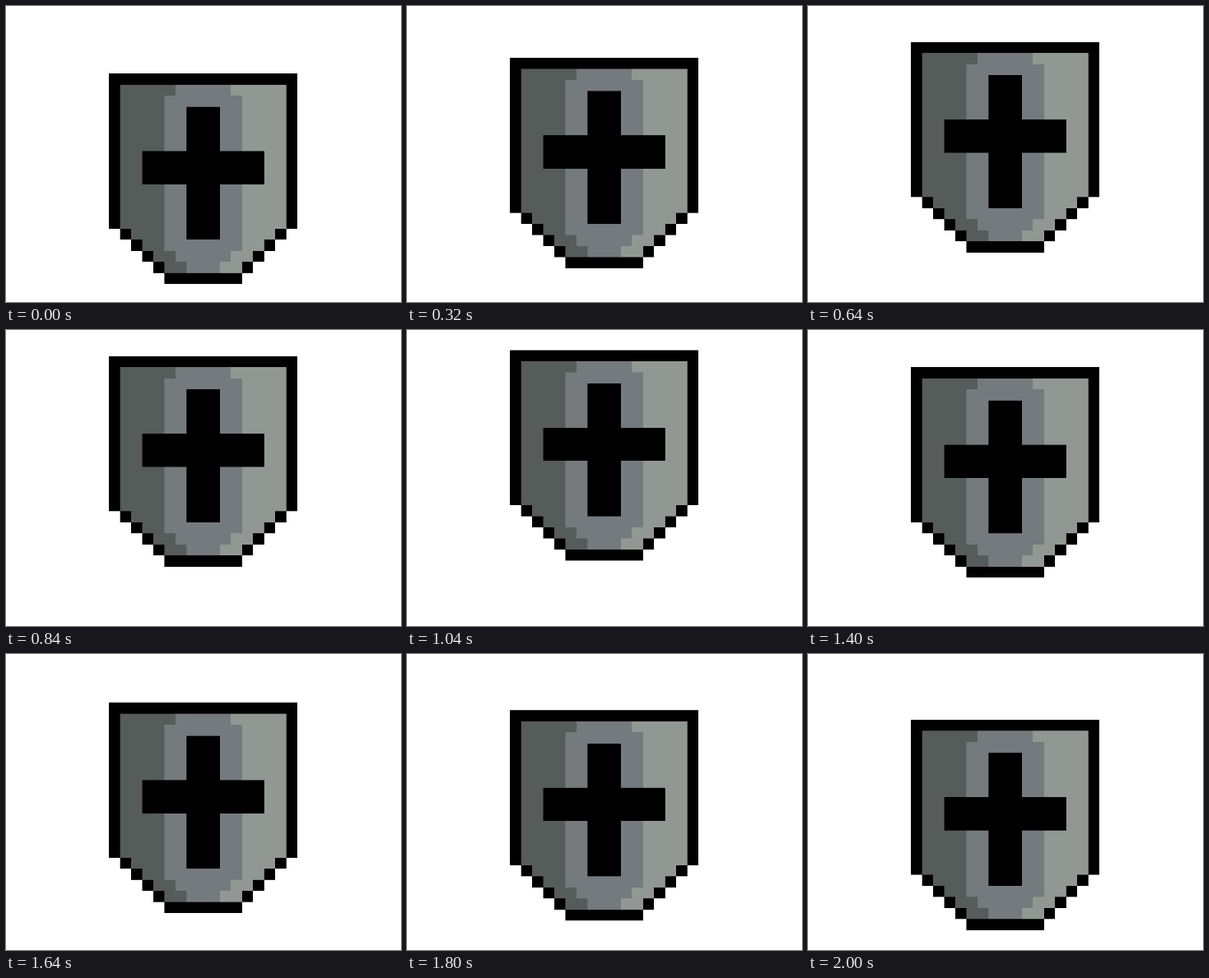
These frames come from a looping animation (480x360 px, 2.04 s). An HTML page with a canvas:

```html
<!DOCTYPE html>
<html lang="en">
<head>
<meta charset="utf-8">
<title>Floating shield</title>
<style>
  html, body { margin: 0; width: 100%; height: 100%; overflow: hidden; background: #fff; }
  canvas { display: block; }
</style>
</head>
<body>
<canvas id="stage" width="480" height="360"></canvas>
<script>
const ctx = document.getElementById('stage').getContext('2d');
const COLS = 17, ROWS = 19, CELL = 13.47, LEFT = 125.1;
const STEP = 40, STEPS = 51, PEAK = 25, LOW = 82.2, HIGH = 22.2;
const BLACK = '#000', DARK = '#565c59', MID = '#757a7e', LIGHT = '#919893';

// Paints the shield at double size with a one-cell clear margin,
// so that scaling it down gives smooth edges at any position.
function makeShield() {
  const size = 27;
  const sprite = document.createElement('canvas');
  sprite.width = (COLS + 2) * size;
  sprite.height = (ROWS + 2) * size;
  const pen = sprite.getContext('2d');
  pen.scale(size, size);
  pen.translate(1, 1);
  const fill = (color, ...box) => {
    pen.fillStyle = color;
    pen.fillRect(...box);
  };

  fill(BLACK, 0, 0, COLS, 1);
  for (let row = 1; row < ROWS - 1; row++) {
    const edge = Math.max(0, row - 13);
    const inset = row === 17 ? 7 : row === 1 || row === 16 ? 6 : 5;
    fill(BLACK, edge, row, COLS - 2 * edge, 1);
    fill(DARK, edge + 1, row, inset - edge - 1, 1);
    fill(MID, inset, row, COLS - 2 * inset, 1);
    fill(LIGHT, COLS - inset, row, inset - edge - 1, 1);
  }
  fill(BLACK, 5, 18, 7, 1);
  // Cross
  fill(BLACK, 7, 3, 3, 12);
  fill(BLACK, 3, 7, 11, 3);
  return sprite;
}

// Rises evenly to the peak, then sinks evenly back.
function shieldTop(step) {
  const lift = step < PEAK ? step / PEAK : (STEPS - step) / (STEPS - PEAK);
  return LOW + (HIGH - LOW) * lift;
}

const shield = makeShield();

function frame() {
  const step = Math.floor(performance.now() / STEP) % STEPS;
  ctx.clearRect(0, 0, 480, 360);
  ctx.drawImage(shield, LEFT - CELL, shieldTop(step) - CELL, (COLS + 2) * CELL, (ROWS + 2) * CELL);
  requestAnimationFrame(frame);
}
frame();
</script>
</body>
</html>
```
